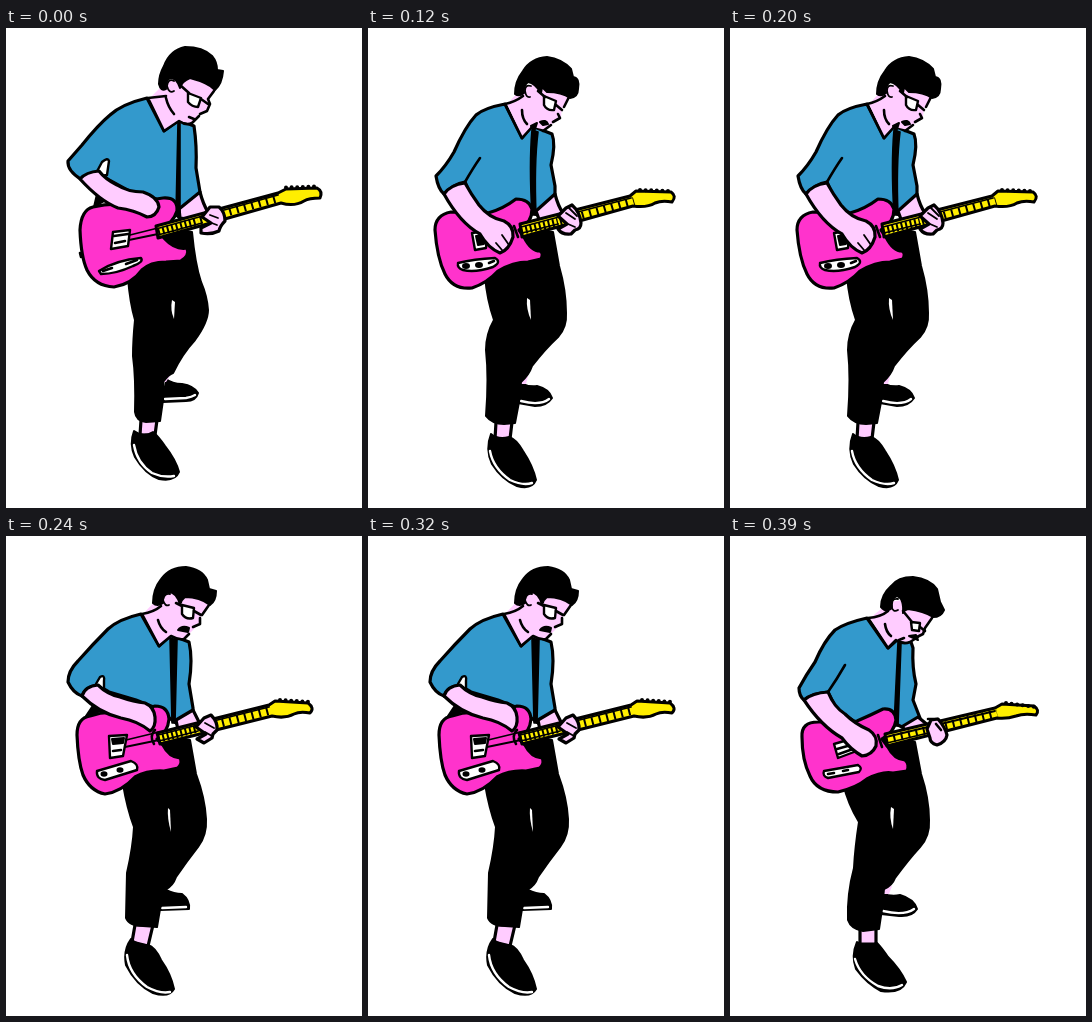
Animation, 356 px wide and 480 px high, one loop 480 ms. Source, as an HTML page without scripts:

```html
<!DOCTYPE html>
<html lang="en">
<head>
<meta charset="utf-8">
<title>Guitar player</title>
<style>
html, body { margin: 0; width: 100%; height: 100%; overflow: hidden; background: #fff; }
svg { display: block; width: 100%; height: 100%; }
path, ellipse { stroke: #000; stroke-width: 3.2; stroke-linejoin: round; stroke-linecap: round; }
.pose { visibility: hidden; animation: show .48s step-end infinite; }
.p2 { animation-delay: -.36s; }
.p3 { animation-delay: -.24s; }
.p4 { animation-delay: -.12s; }
@keyframes show {
  0% { visibility: visible; }
  25%, 100% { visibility: hidden; }
}
.shirt { fill: #3399cc; }
.skin { fill: #ffccff; }
.body { fill: #ff33cc; }
.neck { fill: #ffee00; stroke-width: 3; }
.ink { fill: #000; stroke-width: 2; }
.line { fill: none; stroke-width: 2.6; }
.thin { fill: none; stroke-width: 1.8; }
.strap { fill: #000; stroke-width: 1.6; }
.white { fill: #fff; stroke-width: 2.4; }
.gap { fill: #fff; stroke: none; }
.sole { fill: none; stroke: #fff; stroke-width: 2.4; }
.bare { stroke: none; }
.frets { fill: none; stroke-width: 8; stroke-linecap: butt; stroke-dasharray: 2 5.6; }
.close { fill: none; stroke-width: 8; stroke-linecap: butt; stroke-dasharray: 2 2.6; }
.pegs { fill: none; stroke-width: 4; stroke-dasharray: 0 5.6; }
</style>
</head>
<body>
<svg viewBox="0 0 356 480">

<g class="pose p1">
  <path class="ink" d="M160 351Q166 356 176 356Q188 358 192 365Q190 373 180 373L157 374Z"/>
  <path class="sole" d="M159 371L180 370Q186 369 189 367"/>
  <path class="skin bare" d="M157 348L164 348L160 354L157 354Z"/>
  <path class="skin" d="M135 392L134 407L149 407L151 392Z"/>
  <path class="ink" d="M122 250Q124 275 129 292Q127 312 127 328Q130 350 129 384Q130 393 140 394L154 393L157 372L157 354Q163 346 167 345Q176 326 189 312Q202 294 202 282Q201 268 195 254Q189 236 186 204L150 200Z"/>
  <path class="gap" d="M166 272L169 274L168 291Q164 282 166 272Z"/>
  <path class="ink" d="M128 403Q123 416 129 429Q139 446 153 451Q169 454 173 444Q170 432 159 418Q152 408 147 404Q137 410 128 403Z"/>
  <path class="sole" d="M128 417Q131 435 146 445Q157 450 168 448"/>
  <path class="shirt" d="M141 70Q116 76 104 87Q92 97 76 117L62 133Q61 143 76 152Q82 144 92 144L103 152L125 164L150 171L174 190L188 180L194 164L190 140Q191 118 188 98L173 92L158 103Z"/>
  <path class="white" d="M88 149L96 134Q102 129 103 133L101 147Z"/>
  <path class="skin" d="M173 181L194 164Q197 176 202 184L196 193L174 190Z"/>
  <path class="skin bare" d="M160 54L143 71L158 102L173 93L186 96L193 85L201 82L204 70L210 60L185 45Z"/>
  <path class="line" d="M160 68L142 70L158 103L173 93Q180 98 186 95L190 91L193 88M208 63L202 71L204 76L201 83L194 86M160 70Q162 79 168 86"/>
  <path class="ink" d="M153 56Q153 47 158 38Q164 22 179 19Q197 19 206 28Q211 34 211 42L217 43Q216 56 209 62Q203 55 184 50Q176 53 174 60Q171 50 164 50Q159 53 160 61Q155 64 153 56Z"/>
  <path class="skin thin" d="M168 53Q162 50 161 58Q163 66 168 63"/>
  <path class="white" d="M182 65L195 70L192 79Q186 79 182 74Z"/>
  <path class="line" d="M174 57L183 65M195 71L202 76M183 89L188 91"/>
  <path class="strap" d="M172 94L174 94L174 186L170 186Z"/>
  <path class="ink" d="M91 166L100 172L88 179Z"/>
  <path class="body" d="M87 179Q75 182 74 202Q75 229 81 242Q89 258 108 259Q126 256 136 242Q144 234 160 234L175 233Q184 228 181 220Q169 222 159 211L152 203Q167 196 171 183Q172 169 157 170Q140 172 125 178Q108 174 87 179Z"/>
  <path class="white" d="M107 204L124 202L122 218L105 221Z"/>
  <path class="line" d="M108 208L122 206M109 215L119 213"/>
  <path class="white" d="M93 243Q110 232 135 230Q138 234 127 238Q110 246 95 246Z"/>
  <path class="line" d="M97 243L106 240M120 236L131 232M74 225L75 229"/>
  <path class="thin" d="M124 207L152 200M123 212L152 206"/>
  <path class="neck" d="M150 198L272 165L280 161L311 160Q317 163 314 170Q303 170 298 173Q288 179 275 175L152 210Z"/>
  <path class="close" d="M152 204L192 193"/>
  <path class="frets" d="M194 192L272 170"/>
  <path class="thin" d="M150 201L272 167M152 207L196 195"/>
  <path class="pegs" d="M280 159.500L310 158.500"/>
  <path class="skin" d="M196 189L204 179L213 179Q219 184 219 193Q214 198 213 203Q205 207 195 205L195 200L205 195Z"/>
  <path class="thin" d="M204 187L212 190M203 194L211 197"/>
  <path class="skin" d="M74 151Q80 144 93 143Q99 151 111 157Q122 164 137 164Q152 169 153 179Q150 189 141 189Q128 182 112 180Q94 173 74 151Z"/>
</g>

<g class="pose p2">
  <path class="ink" d="M153 355Q160 359 169 358Q181 361 184 370Q179 378 167 378L150 375Z"/>
  <path class="sole" d="M153 373Q172 378 181 371"/>
  <path class="skin bare" d="M151 348L160 348L158 356L152 356Z"/>
  <path class="skin" d="M128 394L127 411L142 411L144 394Z"/>
  <path class="ink" d="M117 248Q119 272 126 292Q118 306 118 322Q121 350 118 388Q124 396 136 396L147 395L151 374L153 354Q161 347 164 338Q177 321 190 309Q199 299 198 285Q198 262 191 238L185 204L150 200Z"/>
  <path class="gap" d="M159 270L162 272L163 292Q158 281 159 270Z"/>
  <path class="ink" d="M123 406Q117 421 124 436Q134 452 149 458Q164 462 168 452Q165 438 155 423Q148 411 141 409Q130 412 123 406Z"/>
  <path class="sole" d="M122 423Q125 440 142 452Q155 458 164 455"/>
  <path class="shirt" d="M137 76Q116 80 108 87Q97 99 86 124Q78 138 68 148Q70 161 76 166Q85 156 97 154L106 175L122 187L150 178L176 190L187 178L187 158L183 137Q188 116 184 106L164 98L154 110Z"/>
  <path class="line" d="M112 130Q105 140 97 154"/>
  <path class="skin" d="M168 183L187 166Q190 178 195 185L190 195L172 194Z"/>
  <path class="skin bare" d="M156 58L139 76L154 109L165 99L178 102L184 96L193 89L194 80L202 70L180 54Z"/>
  <path class="line" d="M155 68Q147 74 137 76L154 110L164 99M201 69L196 79M190 86L192 90L185 94M175 103L183 97M154 82Q154 91 159 96"/>
  <path class="ink" d="M147 66Q147 53 155 43Q163 30 179 29Q194 31 203 41L205 49Q212 50 210 61Q210 69 202 70Q194 64 179 64L174 59L173 65Q167 55 160 54Q155 58 156 65Q151 69 147 66Z"/>
  <path class="skin thin" d="M163 58Q157 56 157 63Q158 70 162 69"/>
  <path class="white" d="M176 68L188 73L186 82Q179 83 176 77Z"/>
  <path class="line" d="M170 63L177 69M188 77L194 82"/>
  <path class="ink" d="M163 98L169 95L166 104ZM172 94Q178 91 180 96L175 97Z"/>
  <path class="strap" d="M164 102L170 104Q166 136 168 187L164 187Q161 136 164 102Z"/>
  <path class="body" d="M83 184Q67 187 67 202Q69 230 77 246Q85 262 104 260Q119 255 130 243Q145 234 160 234L173 231Q176 225 172 223Q163 223 156 209L151 202Q164 195 164 181Q161 171 148 171Q135 181 120 185Z"/>
  <path class="white" d="M104 205L119 203L118 220L107 222Z"/>
  <path class="ink" d="M108 208L117 207L116 216L110 217Z"/>
  <path class="white" d="M90 235Q106 231 127 230Q134 234 125 239Q107 245 95 242Q89 240 90 235Z"/>
  <ellipse class="ink" cx="98" cy="238" rx="3" ry="2"/><ellipse class="ink" cx="111" cy="237" rx="3" ry="2"/>
  <path class="line" d="M121 235L126 233M146 198L150 209"/>
  <path class="neck" d="M152 196L262 168L268 163L303 164Q309 168 304 174Q294 172 287 175Q279 180 265 178L154 209Z"/>
  <path class="close" d="M153 203L190 194"/>
  <path class="frets" d="M192 194L266 173"/>
  <path class="thin" d="M153 199L263 170M154 205L190 196"/>
  <path class="pegs" d="M272 162L303 163"/>
  <path class="skin" d="M190 188L198 180L204 177Q212 184 213 195Q213 201 207 202L203 206Q194 207 190 201L199 196Z"/>
  <path class="thin" d="M198 185L207 191M200 196L207 199M201 180L209 188"/>
  <path class="skin" d="M76 166Q82 157 97 155Q103 166 111 177Q121 190 136 193Q146 198 145 209Q141 222 132 225Q120 220 112 206Q92 195 76 166Z"/>
  <path class="thin" d="M134 207L141 217M128 215L134 222"/>
</g>

<g class="pose p3">
  <path class="ink" d="M160 354Q168 358 176 358Q184 364 183 373L154 374Z"/>
  <path class="sole" d="M156 372L180 371"/>
  <path class="skin" d="M129 389L126 406L142 410L147 389Z"/>
  <path class="ink" d="M117 248Q121 272 128 291Q127 311 121 337L120 382Q123 390 137 390L151 391L154 373L159 354Q167 350 170 341Q181 325 192 311Q201 299 200 283Q199 262 190 238L184 204L150 200Z"/>
  <path class="gap" d="M162 272L164 274L165 296Q161 282 162 272Z"/>
  <path class="ink" d="M125 403Q117 414 120 429Q130 449 147 457Q163 462 168 453Q165 438 155 424Q149 411 142 409Q132 410 125 403Z"/>
  <path class="sole" d="M121 419Q123 438 141 451Q154 458 164 456"/>
  <path class="shirt" d="M135 78Q113 83 102 93Q87 108 72 125Q62 135 62 146Q67 157 76 160Q79 151 91 149L103 156L130 164L150 172L174 190L187 184L187 172L183 148Q187 123 183 106L165 99L153 110Z"/>
  <path class="white" d="M87 153L94 141Q99 138 98 145L98 152Z"/>
  <path class="skin" d="M170 184L187 174L193 186L190 196L172 194Z"/>
  <path class="skin bare" d="M156 58L137 78L153 109L165 100L176 104L184 97L192 89L196 78L203 69L180 54Z"/>
  <path class="line" d="M155 70Q148 76 136 78L153 110L165 100Q172 104 178 103L183 98M203 69L196 79M194 82L194 88L187 91M152 84Q154 92 160 96"/>
  <path class="ink" d="M147 67Q147 53 155 43Q164 31 180 31Q196 33 201 44L203 53L210 55Q210 65 204 69Q194 61 179 61Q175 64 174 69Q171 56 162 56Q156 59 157 67Q151 71 147 67Z"/>
  <path class="skin thin" d="M164 58Q158 57 157 64Q159 71 163 69"/>
  <path class="white" d="M176 69L188 72L187 82Q180 84 176 78Z"/>
  <path class="line" d="M170 67L176 70M188 75L195 79"/>
  <path class="ink" d="M172 94Q176 89 183 92L182 96Z"/>
  <path class="strap" d="M164 102L171 104L169 187L166 187Z"/>
  <path class="ink" d="M88 168L98 174L80 180Z"/>
  <path class="body" d="M84 180Q71 182 71 199Q72 225 77 239Q84 255 99 258Q115 256 129 241Q142 234 158 235L172 232Q177 227 174 222Q163 221 157 209L151 203Q162 196 163 183Q162 170 149 170Q135 174 124 180Q105 173 84 180Z"/>
  <path class="white" d="M103 200L121 199L117 220L104 222Z"/>
  <path class="ink" d="M106 203L118 202L117 207L107 208Z"/>
  <path class="line" d="M107 215L115 214"/>
  <path class="white" d="M91 235L125 225Q133 228 131 234L99 244Q90 243 91 235Z"/>
  <ellipse class="ink" cx="98" cy="238" rx="2.5" ry="1.8"/><ellipse class="ink" cx="114" cy="234" rx="2.5" ry="1.8"/>
  <path class="thin" d="M120 204L153 196M119 211L153 204"/>
  <path class="neck" d="M151 197L263 169L269 165L302 167Q309 172 304 177Q294 175 288 178Q279 183 266 180L154 208Z"/>
  <path class="close" d="M152 203L190 193"/>
  <path class="frets" d="M194 193L263 175"/>
  <path class="thin" d="M152 199L263 171M153 205L192 195"/>
  <path class="pegs" d="M274 164L304 166"/>
  <path class="skin" d="M190 191L198 182L205 179Q212 186 211 194L207 198L206 202L198 207L191 203L200 198Z"/>
  <path class="thin" d="M199 187L208 192M199 196L206 200"/>
  <path class="line" d="M149 194Q143 200 148 208"/>
  <path class="skin" d="M76 160Q79 150 92 149Q101 158 114 161Q128 166 139 167Q148 171 149 181Q150 191 144 195Q132 185 115 182Q93 177 76 160Z"/>
</g>

<g class="pose p4">
  <path class="ink" d="M153 357Q160 361 170 359Q184 363 187 373Q182 381 169 380L151 378Z"/>
  <path class="sole" d="M153 375Q174 380 184 373"/>
  <path class="skin bare" d="M152 350L162 350L159 358L153 358Z"/>
  <path class="skin" d="M130 392L130 408L146 408L146 392Z"/>
  <path class="ink" d="M113 247Q118 268 129 286Q125 312 124 332Q117 358 118 384Q121 393 133 395L149 393L152 373L154 353Q162 350 165 342Q178 324 190 311Q200 300 199 284Q199 262 191 238L185 206L150 200Z"/>
  <path class="gap" d="M161 271L164 273L163 293Q159 282 161 271Z"/>
  <path class="ink" d="M127 406Q121 420 126 433Q137 448 151 455Q171 458 176 446Q170 433 158 421Q151 411 147 407Q136 412 127 406Z"/>
  <path class="sole" d="M125 423Q130 440 148 450Q162 455 172 449"/>
  <path class="shirt" d="M137 82Q115 87 105 94Q94 105 85 126Q76 139 69 152Q69 160 74 164Q83 157 98 156L106 172L125 186L150 180L174 192L190 182L183 164L186 148Q182 132 183 112L181 106L167 104L158 112Z"/>
  <path class="line" d="M115 129Q107 143 98 156"/>
  <path class="skin" d="M173 190L188 181L199 190L195 198L174 196Z"/>
  <path class="skin bare" d="M160 66L140 82L158 111L167 104L180 107L188 101L194 96L196 88L205 80L183 62Z"/>
  <path class="line" d="M158 75Q151 81 138 82L158 112L166 104Q173 109 180 106L188 101M202 82L195 92L193 98L187 101M155 88Q156 96 161 100"/>
  <path class="ink" d="M151 71Q151 59 161 50Q168 41 183 41Q200 43 207 53L210 66L214 74Q211 81 203 81Q194 75 178 73Q174 74 173 77Q174 62 167 60Q161 62 162 72Q156 77 151 71Z"/>
  <path class="skin thin" d="M168 63Q161 62 161 70Q163 77 168 74"/>
  <path class="white" d="M181 86L190 87L189 95L182 94Z"/>
  <path class="line" d="M173 75L182 86M190 91L195 95M169 104L174 102"/>
  <path class="ink" d="M179 100L186 99L188 104Z"/>
  <path class="strap" d="M168 106L171 107L168 190L164 190Z"/>
  <path class="body" d="M88 186Q71 186 72 201Q72 224 80 240Q87 256 108 256Q126 252 137 243Q152 235 163 237L177 235Q180 228 175 224Q164 223 158 211L152 203Q164 197 166 184Q165 172 153 173Q141 179 127 185Z"/>
  <path class="white" d="M104 208L121 203L124 216L108 222Z"/>
  <path class="line" d="M107 213L121 209M109 218L123 213"/>
  <path class="white" d="M94 235L128 229Q133 232 129 236L98 242Q92 240 94 235Z"/>
  <path class="line" d="M98 238L104 237M113 235L118 234M148 199L152 211"/>
  <path class="neck" d="M155 198L265 172L272 168L304 170Q310 174 306 179Q294 177 286 180Q277 183 267 182L157 210Z"/>
  <path class="frets" d="M156 204L267 177"/>
  <path class="thin" d="M156 201L265 175M157 207L198 197"/>
  <path class="pegs" d="M276 167L306 171"/>
  <path class="skin" d="M197 193L201 184L208 183Q215 191 217 199Q216 206 207 209Q200 207 200 202Z"/>
  <path class="line" d="M198 183L208 183M206 188L211 194"/>
  <path class="skin" d="M74 164Q82 157 98 156Q104 171 115 178Q125 188 139 194Q148 200 146 210Q142 219 132 220Q120 213 112 202Q91 190 74 164Z"/>
</g>

</svg>
</body>
</html>
```
